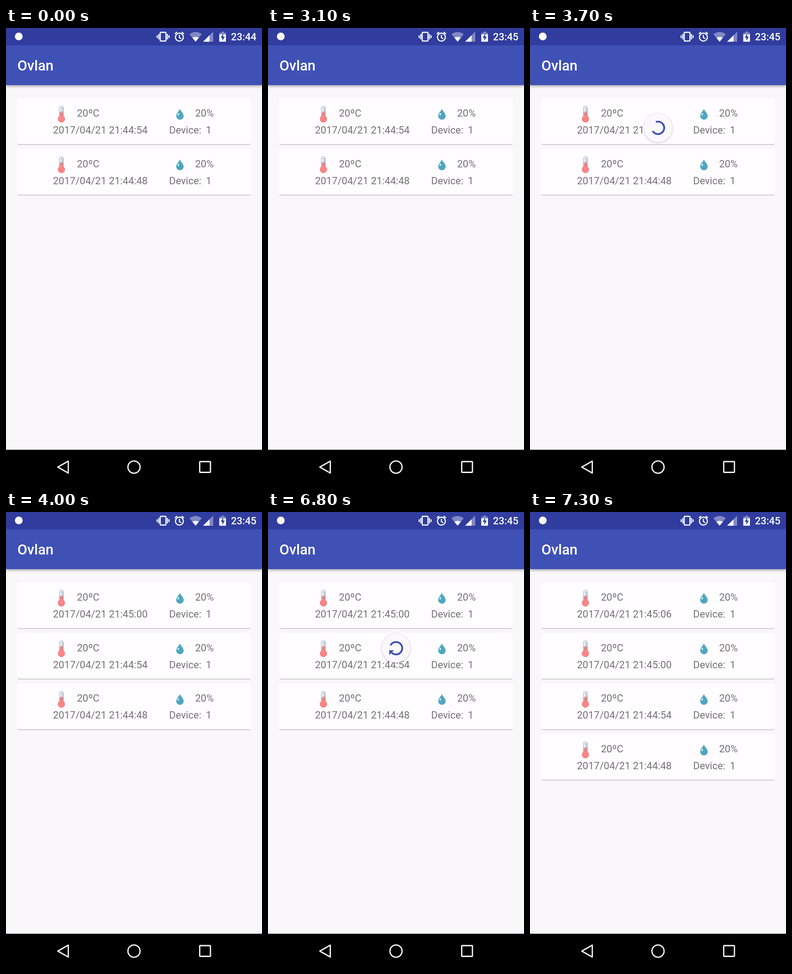
These frames come from a looping animation (561 px wide and 998 px high, 8 s). An HTML page:

```html
<!DOCTYPE html>
<html lang="en">
<head>
<meta charset="utf-8">
<title>Sensor readings</title>
<style>
  html, body { margin: 0; width: 100%; height: 100%; overflow: hidden; background: #f9f7fa; }
  svg { display: block; width: 100%; height: 100%; font-family: Roboto, sans-serif; }
  .card { fill: #fffdff; filter: drop-shadow(0 1.3px 1.3px rgba(0,0,0,.32)); }
  .label { font-size: 22px; fill: #727175; }
  .bar { filter: drop-shadow(0 2px 3px rgba(0,0,0,.38)); }
  .disc { fill: #faf8fb; filter: drop-shadow(0 1px 2.5px rgba(0,0,0,.24)); }
  .medium { font-weight: 500; fill: #fff; }
</style>
</head>
<body>
<svg viewBox="0 0 561 998">
  <defs>
    <clipPath id="content"><rect x="25" y="150" width="511" height="773"/></clipPath>
    <g id="thermometer" stroke-width="1">
      <path d="M117 193V175a4.5 4.5 0 0 1 9 0V193z" fill="#e6eef6" stroke="#a3aebd"/>
      <path d="M117.5 184h8v9h-8z" fill="#fd8586"/>
      <circle cx="121.5" cy="199" r="7.3" fill="#fd8586" stroke="#dc6d70"/>
      <path d="M118 184h7v10h-7z" fill="#fd8586"/>
      <path d="M120.500 175.500h5M122 179h3.500M120.500 182.500h5M122 186h3.500M120.500 189.500h5" stroke="#7b8391" fill="none"/>
    </g>
    <g id="drop">
      <path d="M381 177C379 182 373 187 373 192.500A8.200 8.200 0 0 0 389.400 192.500C389.400 187 383 182 381 177z" fill="#4fa6c0"/>
      <ellipse cx="377.500" cy="189" rx="1.500" ry="2.800" transform="rotate(25 377.500 189)" fill="#e4f5fa"/>
    </g>
  </defs>

  <rect width="561" height="998" fill="#f9f7fa"/>
  <g id="list" clip-path="url(#content)"></g>
  <g clip-path="url(#content)">
    <g id="spinner">
      <circle class="disc" r="31.200"/>
      <g id="ring">
        <path id="arc" fill="none" stroke="#3f51b5" stroke-width="3.900"/>
        <path id="arrow" fill="#3f51b5"/>
      </g>
    </g>
  </g>

  <rect class="bar" width="561" height="125" fill="#3f51b5"/>
  <rect width="561" height="38" fill="#303d9f"/>
  <text class="medium" x="25" y="93" font-size="31.200">Ovlan</text>

  <g fill="#fff">
    <circle cx="28" cy="18.500" r="8.500"/>
    <g fill="none" stroke="#fff" stroke-width="2.400">
      <rect x="338" y="9.500" width="12.500" height="19" rx="1"/>
      <path d="M335 13v12M331.300 16v6M353.700 13v12M357.300 16v6"/>
      <circle cx="380" cy="20" r="8.700"/>
      <path d="M380 15v6l4 2.500M370 13l5-4M390 13l-5-4"/>
    </g>
    <path d="M415.500 30L402 13.500Q415.500 4 429 13.500z" opacity=".4"/>
    <path d="M415.500 30L408.500 21.500Q415.500 17.500 422.500 21.500z"/>
    <path d="M432 30H454V8z" opacity=".4"/>
    <path d="M432 30H446V16z"/>
    <path d="M467.500 10.500H472V8H478V10.500H482V30H467.500z" opacity=".4"/>
    <path d="M467.500 14H482V30H467.500z"/>
    <path d="M476 12.500L470.500 21.500H474V28L479.500 19H476z" fill="#303d9f"/>
    <text id="clock" class="medium" x="493" y="27" font-size="22"></text>
  </g>

  <rect y="923" width="561" height="75"/>
  <g fill="none" stroke="#f4f4f4" stroke-width="2.800">
    <path d="M113.500 961L136.500 948V974z" stroke-linejoin="round"/>
    <circle cx="280.500" cy="961" r="13.300"/>
    <rect x="424.500" y="949" width="23.500" height="23.500" rx="1"/>
  </g>
</svg>
<script>
const LOOP = 8000, DP = 561 / 360;
const CARD_PITCH = 110.7;
const RETURN_MS = 200, SPIN_MS = 140, SHRINK_MS = 150, COLLAPSE_MS = 666;
// Each pull-to-refresh: when the drag begins and when the new reading arrives.
const refreshes = [{ drag: 3130, done: 3775 }, { drag: 6620, done: 7130 }];

const $ = id => document.getElementById(id);
const clamp = (v, lo = 0, hi = 1) => Math.min(hi, Math.max(lo, v));
const mix = (a, b, k) => a + (b - a) * k;

const cardMarkup = i => `
  <g transform="translate(0 ${i * CARD_PITCH})">
    <rect class="card" x="25" y="153" width="511" height="101" rx="3"/>
    <use href="#thermometer"/><use href="#drop"/>
    <g class="label">
      <text x="155.500" y="194">20ºC</text>
      <text x="414.500" y="194">20%</text>
      <text class="stamp" x="103" y="231"></text>
      <text x="357.500" y="231">Device:</text>
      <text x="438" y="231">1</text>
    </g>
  </g>`;
$('list').innerHTML = [0, 1, 2, 3].map(cardMarkup).join('');
const cards = [...$('list').children];

function timestamp(reading) {
  const seconds = 44 * 60 + 48 + reading * 6;
  const pad = n => String(n).padStart(2, '0');
  return `2017/04/21 21:${pad(Math.floor(seconds / 60))}:${pad(seconds % 60)}`;
}

// Rubber-band pull: pull 1 is the trigger distance, pull 3 the furthest stretch.
function pulled(pull) {
  const s = clamp(pull - 1, 0, 2) / 4;
  const tension = (s - s * s) * 2;
  const adjusted = Math.max(clamp(pull) - 0.4, 0) * 5 / 3;
  return {
    top: -40 + 64 * (clamp(pull) + tension * 2),
    start: 0,
    end: 0.8 * adjusted,
    rotation: (-0.25 + 0.4 * adjusted + tension * 2) * 0.5,
    alpha: pull < 1 ? 0.3 : mix(0.3, 1, (pull - 1) / 2),
    arrow: adjusted,
    scale: 1
  };
}

function spinnerState(t, { drag, done }) {
  const spin = done - SPIN_MS, release = spin - RETURN_MS;
  if (t < drag || t >= done + SHRINK_MS) return null;
  const state = pulled(3 * Math.sin(clamp((t - drag) / (release - drag)) * Math.PI / 2));
  if (t < release) return state;

  const back = clamp((t - release) / RETURN_MS);
  state.top = mix(state.top, 24, 1 - (1 - back) ** 4);
  state.arrow = 1 - back;
  const collapse = clamp((t - spin) / COLLAPSE_MS);
  state.start = mix(0, state.end - 0.03, collapse);
  state.rotation = mix(state.rotation, 1, collapse);
  state.scale = 1 - clamp((t - done) / SHRINK_MS);
  return state;
}

function drawSpinner(state) {
  $('spinner').style.display = state ? '' : 'none';
  if (!state) return;
  const radius = 8.75 * DP;
  const from = (state.start + state.rotation) * 2 * Math.PI;
  const to = (state.end + state.rotation) * 2 * Math.PI;
  const point = a => `${radius * Math.cos(a)} ${radius * Math.sin(a)}`;
  const y = 150 + (state.top + 20) * DP;
  $('spinner').setAttribute('transform', `translate(280.5 ${y}) scale(${state.scale})`);
  $('ring').setAttribute('opacity', state.alpha);
  $('arc').setAttribute('d',
    `M${point(from)}A${radius} ${radius} 0 ${to - from > Math.PI ? 1 : 0} 1 ${point(to)}`);
  const half = 5 * DP * state.arrow;
  $('arrow').setAttribute('d', `M${radius - half} 0H${radius + half}L${radius} ${half}z`);
  $('arrow').setAttribute('transform', `rotate(${to * 180 / Math.PI})`);
}

function draw(t) {
  $('clock').textContent = t < 900 ? '23:44' : '23:45';
  const count = 2 + refreshes.filter(r => t >= r.done).length;
  cards.forEach((card, i) => {
    card.style.display = i < count ? '' : 'none';
    card.querySelector('.stamp').textContent = timestamp(count - 1 - i);
  });
  drawSpinner(refreshes.map(r => spinnerState(t, r)).find(Boolean));
}

const begin = performance.now();
function tick() {
  draw((performance.now() - begin) % LOOP);
  requestAnimationFrame(tick);
}
tick();
</script>
</body>
</html>
```
